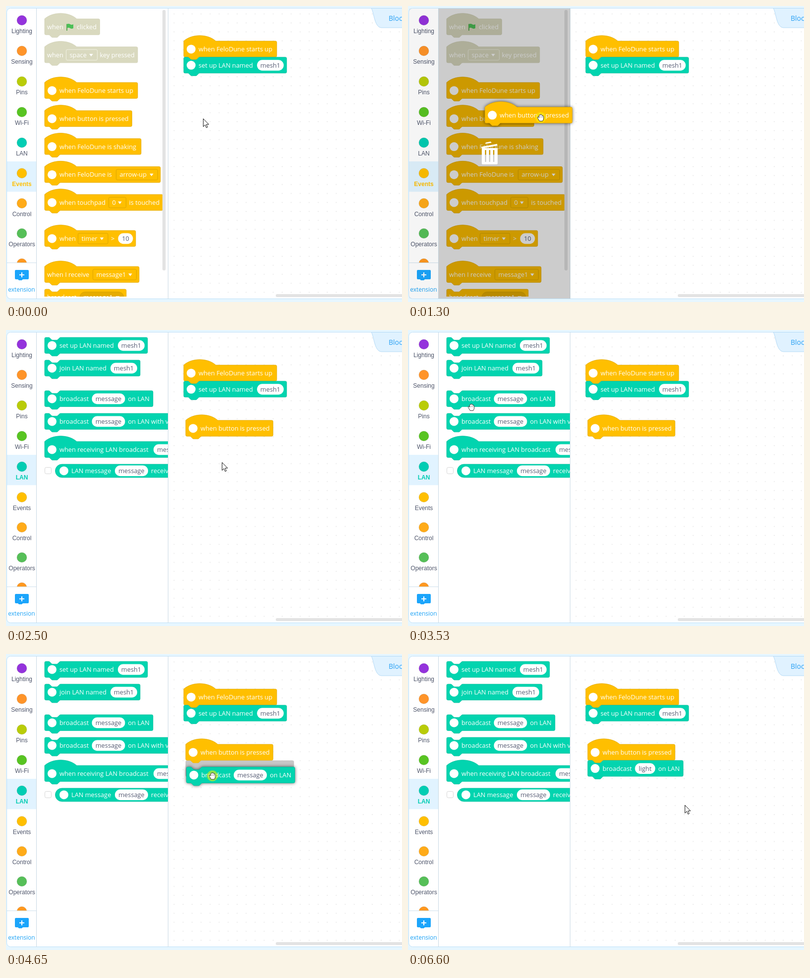
An HTML page for the animation above (6.89 s loop, 800 by 600 pixels).

```html
<!DOCTYPE html>
<html lang="en">
<head>
<meta charset="utf-8">
<title>Block editor</title>
<style>
  html, body { margin: 0; width: 100%; height: 100%; overflow: hidden; background: #e6f6ff; }
  svg { display: block; }
  text { font: 12.8px "Open Sans", "Noto Sans", sans-serif; fill: #fff; white-space: pre; }
  .dark { fill: #575e75; }
  .mid { text-anchor: middle; }
  .label { font: 12px "Liberation Sans", Arial, sans-serif; fill: #4f566b; text-anchor: middle; }
  .active { font-weight: bold; }
  .link { font-size: 12px; fill: #1ea3f5; }
  .lifted { filter: drop-shadow(0 0 3px rgba(0, 0, 0, .6)); }
</style>
</head>
<body>
<svg id="stage" width="800" height="600" viewBox="0 0 800 600"></svg>
<script>
const LOOP = 6890;
const ORANGE = { fill: '#ffbf00', line: '#d9a300' };
const GREEN = { fill: '#02d4af', line: '#00b795' };
const OFF = { fill: '#d9d9bf', line: '#cfcfb5' };
const GHOST = { fill: '#c6c6c6', line: '#c6c6c6' };
const SCALE = 0.675;
const MID = 16.4;

// Pieces placed inside a block, x relative to its left edge
const icon = () => `<circle cx="15" cy="${MID}" r="9" fill="#fff"/>`;
const word = (x, s, cls = '') => `<text x="${x}" y="${MID + 4.5}" class="${cls}">${s}</text>`;
const arrow = x => `<path d="M${x - 3.8} ${MID - 2.2}h7.6l-3.8 5.4z" fill="#fff"/>`;

function pill(x, w, s, state) {
  const marks = {
    selected: `<rect x="${x + 6}" y="${MID - 8}" width="${w - 12}" height="16" fill="#3297fd"/>`,
    caret: `<path d="M${x + w - 6.5} ${MID - 7}v14" stroke="#333"/>`
  };
  return `<rect x="${x}" y="${MID - 10.8}" width="${w}" height="21.6" rx="10.8" fill="#fff"/>` +
    (marks[state] || '') + word(x + w / 2, s, state === 'selected' ? 'mid' : 'mid dark');
}

function menu(x, w, s, line = '#d9a300', round) {
  return `<rect x="${x}" y="${MID - 10.8}" width="${w}" height="21.6" rx="${round ? 10.8 : 2.7}"
    fill="${round ? '#e6ac00' : 'none'}" stroke="${line}" stroke-width=".9"/>` +
    word(x + 7, s) + arrow(x + w - 12.5);
}

function block(x, y, w, color, inner, hat) {
  const W = w / SCALE;
  const top = hat ? 'M0 0c25-22 71-22 96 0'
    : 'M0 4a4 4 0 0 1 4-4h8c2 0 3 1 4 2l4 4c1 1 2 2 4 2h12c2 0 3-1 4-2l4-4c1-1 2-2 4-2';
  const rest = `H${W - 4}a4 4 0 0 1 4 4v40a4 4 0 0 1-4 4H48c-2 0-3 1-4 2l-4 4c-1 1-2 2-4 2` +
    'H24c-2 0-3-1-4-2l-4-4c-1-1-2-2-4-2H4a4 4 0 0 1-4-4z';
  return `<g transform="translate(${x} ${y})"><path transform="scale(${SCALE})" d="${top + rest}"
    fill="${color.fill}" stroke="${color.line}"/>${inner}</g>`;
}

const hat = (x, y, w, inner, color = ORANGE) => block(x, y, w, color, inner, true);
const lan = (x, y, w, inner) => block(x, y, w, GREEN, icon() + inner);
const led = s => icon() + word(30, s);
const startUp = (x, y) => hat(x, y, 188, led('when FeloDune starts up'));
const setUp = (x, y) => lan(x, y, 208, word(30, 'set up LAN named') + pill(148, 54, 'mesh1'));
const button = (x, y) => hat(x, y, 176.5, led('when button is pressed'));
const send = (x, y, state) => lan(x, y, 219,
  word(30, 'broadcast') + pill(95.5, 67, 'message', state) + word(168.5, 'on LAN'));
const sendLight = (x, y, state) => lan(x, y, 193,
  word(30, 'broadcast') + pill(95.5, 41, 'light', state) + word(142.5, 'on LAN'));

function eventPalette() {
  const flag = '<path d="M45 10.5v13.5" stroke="#45993d" stroke-width="1.6"/>' +
    '<path d="M45 11q3.5-2 6.500 0t6.500 0v8q-3.500 2-6.500 0t-6.500 0z" fill="#4cbf56"/>';
  const x = 78;
  return hat(x, 26, 111.5, word(5, 'when') + flag + word(65, 'clicked'), OFF) +
    hat(x, 82.700, 188, word(5, 'when') + menu(43.5, 63, 'space', '#f4f4e6') + word(111.5, 'key pressed'), OFF) +
    startUp(x, 155) +
    button(x, 212) +
    hat(x, 268.7, 195, led('when FeloDune is shaking')) +
    hat(x, 325.5, 234, led('when FeloDune is') + menu(144.500, 84, 'arrow-up')) +
    hat(x, 382, 239, led('when touchpad') + menu(129.500, 35, '0') + word(170.5, 'is touched')) +
    hat(x, 455, 184, led('when') + menu(67.5, 60.5, 'timer') + word(134, '&gt;') + pill(148.5, 30, '10')) +
    hat(x, 528, 191, word(5, 'when I receive') + menu(97.5, 88, 'message1')) +
    block(x, 574, 165, ORANGE, word(5, 'broadcast') + menu(71, 89, 'message1', '#d9a300', true)) +
    '<rect x="316" y="8" width="6.5" height="528" rx="3" fill="#e3e3e3"/>';
}

function lanPalette() {
  const x = 78;
  return setUp(x, 15) +
    lan(x, 61, 193, word(30, 'join LAN named') + pill(133, 54, 'mesh1')) +
    send(x, 123) +
    lan(x, 169, 330, word(30, 'broadcast') + pill(95.5, 67, 'message') + word(168.5, 'on LAN with value')) +
    hat(x, 226, 320, led('when receiving LAN broadcast') + pill(220, 67, 'message'), GREEN) +
    '<rect x="78.5" y="278.500" width="13" height="13" rx="3" fill="#fff" stroke="#d5d5d5"/>' +
    `<g transform="translate(102 269)"><rect x="-2.5" y="3" width="300" height="27" rx="13.5"
      fill="${GREEN.fill}" stroke="${GREEN.line}" stroke-width=".7"/>` +
    led('LAN message') + pill(118, 67, 'message') + word(191, 'received value') + '</g>';
}

const categories = [
  ['Lighting', 29, '#9433dc'], ['Sensing', 91, '#ff9429'], ['Pins', 153, '#b9cc08'],
  ['Wi-Fi', 215, '#58c422'], ['LAN', 277, '#02cdb3'], ['Events', 339, '#ffbf00'],
  ['Control', 400, '#ffab19'], ['Operators', 461, '#56bf58'], ['', 522, '#ff981f']
];

function sidebar(active, color) {
  const items = categories.map(([name, y, fill]) => {
    const on = name === active;
    return (on ? `<rect x="2" y="${y - 24}" width="59" height="61.500" fill="#e1f3ff"/>` : '') +
      `<circle cx="32" cy="${y}" r="10" fill="${fill}" stroke="#000" stroke-opacity=".13" stroke-width=".8"/>` +
      `<text x="32" y="${y + 25.500}" class="label ${on ? 'active' : ''}" ${on ? `style="fill:${color}"` : ''}>${name}</text>`;
  });
  return `<g clip-path="url(#side)">${items.join('')}</g>`;
}

const trash = '<g fill="#fff"><path d="M148 285.500l32-6 .7 3.500-32 6zM156 279.500l1-2.800 10-1.900 2 2.400z"/>' +
  '<path fill-rule="evenodd" d="M149 288h32v31q0 2-2 2h-28q-2 0-2-2z' +
  'm6.500 4v24h2.500v-24zm8.200 0v24h2.500v-24zm8.200 0v24h2.500v-24z"/></g>';

const cursors = {
  arrow: '<path d="M.5.5v16l3.700-3.500 2.500 5.700 2.500-1.100-2.500-5.600h5z" fill="#fff" stroke="#111"/>',
  hand: '<path d="M-6 1q-1.500-3 1-2.500l1.500 1.500v-4.500q1-2 2.300-.3v-1.200q1.200-1.500 2.400 0v1q1.300-1.300 2.300.2v1.500' +
    'q1.500-1 2.300.6v4.200q0 2.500-2 5.500h-6.300z" fill="#fff" stroke="#222" stroke-width=".9"/>' +
    '<path d="M-1.200-3v3M1.200-3v3M3.500-2.500v2.500" stroke="#555" stroke-width=".6"/>',
  beam: '<path d="M-3-8.500h2.500l.5.500.5-.5h2.500M0-8v16M-3 8.500h2.500l.5-.5.5.5h2.500" fill="none" stroke="#111"/>'
};

const layer = (id, inner, attrs = '') => `<g id="${id}" ${attrs}>${inner}</g>`;

document.getElementById('stage').innerHTML = `
  <defs>
    <pattern id="dots" x="330" y="7" width="18.2" height="18.2" patternUnits="userSpaceOnUse">
      <circle cx="9.500" cy="9" r=".9" fill="#e0e0e0"/></pattern>
    <clipPath id="side"><rect x="2" y="5" width="60" height="515"/></clipPath>
    <clipPath id="tray"><rect id="trayBox" x="62" y="5" width="265" height="584"/></clipPath>
    <clipPath id="panel"><rect x="2" y="5" width="810" height="588.500" rx="8"/></clipPath>
  </defs>
  <rect width="800" height="600" fill="#e6f6ff"/>
  <rect x="1.500" y="4.500" width="810" height="589" rx="8" fill="#fff" stroke="#bfe0f7"/>
  <rect x="328" y="5" width="472" height="588" fill="url(#dots)"/>
  <path d="M738 4.500c6 10 6 39.500 21 39.500h50v-39.500z" fill="#e0f2ff" stroke="#b4daf6"/>
  <text x="773" y="30" style="font-size:14px;fill:#2aa1f3">Blocks</text>
  <rect x="545" y="584" width="270" height="6" rx="3" fill="#e3e3e3"/>
  ${startUp(359, 71)}${setUp(359, 103.700)}
  <g clip-path="url(#panel)">
    ${layer('eventSide', sidebar('Events', '#ffbf00'))}
    ${layer('lanSide', sidebar('LAN', '#02cdb3'))}
    <path d="M2 520.500h59" stroke="#cfe0ec"/>
    <path d="M20 535h24q2 0 2 2v15q0 2-2 2h-10l-2 2h-6l-2-2h-4q-2 0-2-2v-15q0-2 2-2z" fill="#1ba5fb"/>
    <path d="M27 545h10M32 540v10" stroke="#fff" stroke-width="2"/>
    <text x="31.500" y="579" class="mid link">extension</text>
    <g clip-path="url(#tray)">${layer('eventTray', eventPalette())}${layer('lanTray', lanPalette())}</g>
    <path d="M61.500 5v589M327.500 5v589" stroke="#c9d9e4"/>
  </g>
  ${layer('bin', `<rect x="2" y="5" width="60" height="588" fill="#000" opacity=".04"/>
    <rect x="62" y="5" width="265.500" height="588" fill="#000" opacity=".2"/>${trash}`)}
  ${layer('ghost', block(363, 216, 218.500, GHOST, ''))}
  ${layer('button', button(0, 0))}
  ${layer('send', send(0, 0))}
  ${layer('sendSelected', send(363, 215.700, 'selected'))}
  ${layer('lightCaret', sendLight(363, 215.700, 'caret'))}
  ${layer('light', sendLight(363, 215.700))}
  ${layer('pointer', '<circle id="press" r="11" fill="#ffee00" opacity=".55"/>' +
    Object.keys(cursors).map(k => layer(k, cursors[k])).join(''))}`;

// The screen refreshes at these moments only: [first, last, count]
const ticks = [0, 2500, 5860, 6040];
[[260, 910, 8], [1000, 1660, 8], [1750, 2400, 8], [2770, 3440, 8], [3530, 3790, 4], [3980, 4650, 8],
  [4930, 5200, 4], [5380, 5670, 4], [6210, 6600, 5]].forEach(([a, b, n]) => {
  for (let i = 0; i < n; i++) ticks.push(Math.round((a + (b - a) * i / (n - 1)) / 10) * 10);
});
ticks.sort((a, b) => a - b);

// Paths as [time, x, y]
const pointerPath = [[170, 398, 228], [910, 190, 234], [1100, 190, 234], [1660, 433, 210], [1840, 477, 203],
  [1940, 477, 203], [2400, 461, 255], [2499, 461, 255], [2500, 436, 268], [2680, 436, 268], [3440, 128, 165],
  [3700, 128, 140], [3900, 128, 140], [3980, 170, 178], [4080, 214, 211], [4270, 310, 236], [4460, 390, 246],
  [4560, 417, 247], [4930, 417, 247], [5200, 500, 269], [5300, 500, 269], [5670, 491, 227],
  [6125, 491, 227], [6600, 559, 306]];
const buttonPath = [[1100, 78, 212], [1660, 318.5, 190], [1840, 363, 183]];
const sendPath = [[3900, 78, 123], [3980, 105, 150], [4080, 151, 185], [4270, 251, 217], [4460, 335, 228],
  [4560, 364.5, 229], [4929, 364.5, 229], [4930, 363, 215.7]];

function at(path, t) {
  const i = path.findIndex(p => p[0] > t);
  if (i < 1) return (i ? path[path.length - 1] : path[0]).slice(1);
  const [a, b] = [path[i - 1], path[i]];
  const k = (t - a[0]) / (b[0] - a[0]);
  return [a[1] + (b[1] - a[1]) * k, a[2] + (b[2] - a[2]) * k];
}

const el = id => document.getElementById(id);
const show = (id, on) => { el(id).style.display = on ? '' : 'none'; };
const place = (id, [x, y]) => el(id).setAttribute('transform', `translate(${x} ${y})`);

function draw(t) {
  const within = (a, b) => t >= a && t < b;
  const pos = at(pointerPath, t);
  const dragButton = within(1180, 1920), dragSend = within(3980, 4930);
  const lanOpen = t >= 2500;

  show('eventSide', !lanOpen);
  show('eventTray', !lanOpen);
  show('lanSide', lanOpen);
  show('lanTray', lanOpen);
  el('trayBox').setAttribute('height', within(820, 1180) ? 588 : 584);
  show('bin', (dragButton || dragSend) && pos[0] < 328);

  show('button', t >= 1180);
  place('button', at(buttonPath, t));
  el('button').classList.toggle('lifted', dragButton);
  show('ghost', within(4400, 4930));
  show('send', within(3980, 5860));
  place('send', at(sendPath, t));
  el('send').classList.toggle('lifted', dragSend);
  show('sendSelected', within(5860, 6040));
  show('lightCaret', within(6040, 6400));
  show('light', t >= 6400);

  const kind = within(680, 2030) || within(3200, 5020) ? 'hand' : within(5500, 6270) ? 'beam' : 'arrow';
  Object.keys(cursors).forEach(k => show(k, k === kind));
  show('press', within(1050, 1920) || within(3700, 4930) || within(5860, 6040));
  place('pointer', pos);
}

let last = -1;
const begin = performance.now();
function frame() {
  const t = (performance.now() - begin) % LOOP;
  const tick = ticks.filter(v => v <= t).pop();
  if (tick !== last) draw(last = tick);
  requestAnimationFrame(frame);
}
frame();
</script>
</body>
</html>
```
